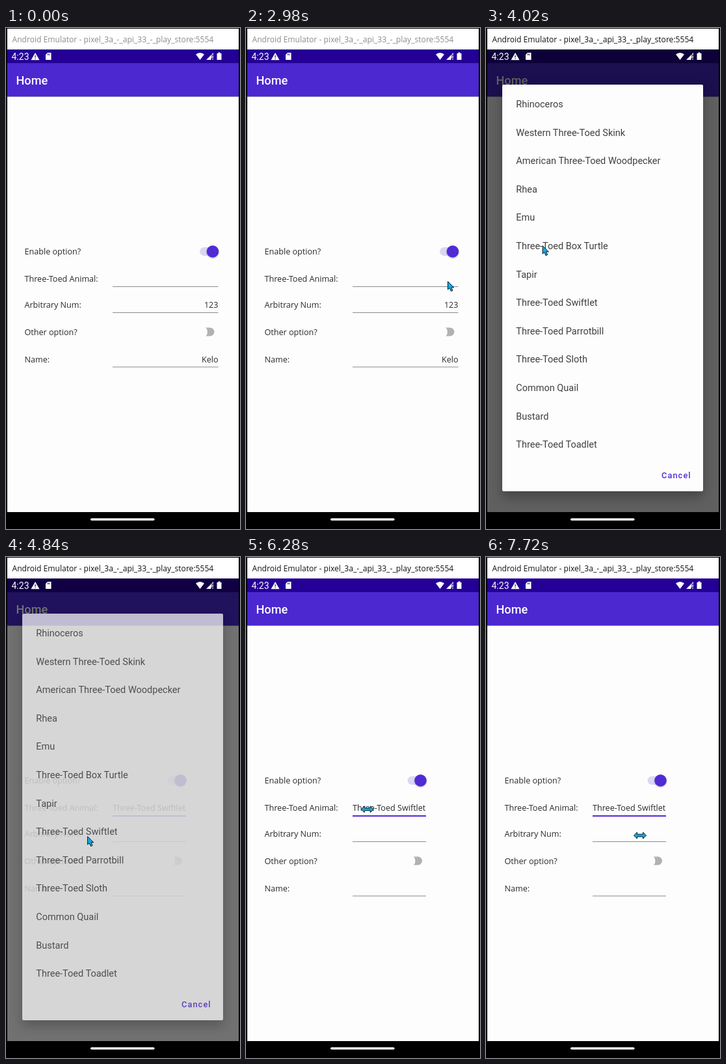
These frames come from a looping animation (360x770 px, 8000 ms). An HTML page:

```html
<!DOCTYPE html>
<html lang="en">
<head>
<meta charset="utf-8">
<title>Animal picker</title>
<style>
  html, body { margin: 0; width: 100%; height: 100%; overflow: hidden; background: #000; }
  svg { display: block; width: 360px; height: 770px; }
  text { font: 12.6px "Open Sans", "Noto Sans", sans-serif; fill: #2a2a2a; white-space: pre; }
  .roboto { font: 14.5px Roboto, sans-serif; fill: #404040; }
  .medium { font: 500 18.1px Roboto, sans-serif; fill: #fff; }
  #title { font-size: 12.1px; }
  #clock { font-size: 14px; font-weight: 400; }
  #cancel { font: 500 12.7px Roboto, sans-serif; letter-spacing: 1.13px; fill: #512bd4; }
  #panel { filter: drop-shadow(0 9px 9px rgba(0, 0, 0, .3)); }
  .thumb { filter: drop-shadow(0 1px 1px rgba(0, 0, 0, .3)); }
  .end { text-anchor: end; }
  .cursor { fill: #14a9e2; stroke: #0a1a26; stroke-width: 1; stroke-linejoin: round; }
</style>
</head>
<body>
<svg viewBox="0 0 360 770">
  <rect width="360" height="770"/>
  <rect x="2" y="1" width="356" height="32" fill="#fff"/>
  <text id="title" x="9.5" y="22">Android Emulator - pixel_3a_-_api_33_-_play_store:5554</text>

  <rect x="2" y="33" width="356" height="22" fill="#240096"/>
  <rect x="2" y="54" width="356" height="51.5" fill="#4b28d0"/>
  <rect x="2" y="105.5" width="356" height="638.5" fill="#fdfdfd"/>
  <text class="medium" x="15.5" y="87.3">Home</text>
  <g id="labels"></g>
  <g id="switches">
    <rect x="298" y="337" width="28" height="13" rx="6.5" fill="#dcd5f4"/>
    <circle class="thumb" cx="318" cy="343.5" r="9.3" fill="#512bd4"/>
    <rect x="294" y="460.5" width="26.5" height="13" rx="6.5" fill="#b2b2b2"/>
    <circle cx="300" cy="467" r="10" fill="#fdfdfd"/>
  </g>
  <g id="lines" fill="#8c8c8c">
    <rect id="field" x="164" y="397"/>
    <rect x="164" y="437" height="1"/>
    <rect x="164" y="520.5" height="1"/>
  </g>
  <g id="before">
    <text class="end" x="326.5" y="429.7">123</text>
    <text class="end" x="326.5" y="513.5">Kelo</text>
  </g>
  <text id="choice" x="164" y="389.5">Three-Toed Swiftlet</text>

  <rect id="scrim" x="2" y="33" width="356" height="711"/>
  <g fill="#fff">
    <text id="clock" class="medium" x="8.5" y="49">4:23</text>
    <path fill-rule="evenodd" d="M45 38L51.5 49.2H38.5ZM44.4 42V45.5H45.6V42ZM44.4 46.5V47.8H45.6V46.5Z"/>
    <path fill-rule="evenodd" d="M64 38H69.5V49H61V41ZM64 39.5V42H65V39.5ZM66 39.5V42H67V39.5Z"/>
    <path d="M292 40.6Q298.5 35.4 305 40.6L298.5 49Z"/>
    <path d="M319 38V41H316.5V46.5H315.5V49H308ZM317.5 42H318.8V46.5H317.5ZM317.5 47.5H318.8V49H317.5Z"/>
    <path d="M324.5 39H326.5V37.5H329.5V39H331.5V49H324.5Z"/>
    <rect x="130" y="753.5" width="98.5" height="3.6" rx="1.8"/>
  </g>

  <g id="dialog">
    <rect id="panel" x="25" y="87" width="309" height="625" rx="2" fill="#fdfdfd"/>
    <g id="items"></g>
    <text id="cancel" x="270" y="691.5">Cancel</text>
  </g>

  <path id="arrow" class="cursor" d="M.5 .5V13L3.3 10.6L5.4 15.5L8 14.4L6 9.7H9.8Z"/>
  <path id="resize" class="cursor" d="M-9.5 0L-4.5 -5V-1.9H4.5V-5L9.5 0L4.5 5V1.9H-4.5V5Z"/>
</svg>
<script>
const LOOP = 8000;
const $ = id => document.getElementById(id);
const clamp = v => Math.min(1, Math.max(0, v));
const ramp = (t, start, length) => clamp((t - start) / length);
const show = (node, on) => node.style.display = on ? '' : 'none';

function addText(parent, str, x, y, cls) {
  const node = document.createElementNS('http://www.w3.org/2000/svg', 'text');
  node.setAttribute('x', x);
  node.setAttribute('y', y);
  node.setAttribute('class', cls);
  node.textContent = str;
  parent.append(node);
}

const labels = ['Enable option?', 'Three-Toed Animal:', 'Arbitrary Num:', 'Other option?', 'Name:'];
const baselines = [347.5, 389.5, 429.7, 471.5, 513.5];
labels.forEach((s, i) => addText($('labels'), s, 28.5, baselines[i], ''));

const animals = ['Rhinoceros', 'Western Three-Toed Skink', 'American Three-Toed Woodpecker',
  'Rhea', 'Emu', 'Three-Toed Box Turtle', 'Tapir', 'Three-Toed Swiftlet',
  'Three-Toed Parrotbill', 'Three-Toed Sloth', 'Common Quail', 'Bustard', 'Three-Toed Toadlet'];
animals.forEach((s, i) => addText($('items'), s, 46.3, 122 + 43.6 * i, 'roboto'));

// Waypoints: time, x, y
const arrowPath = [
  [1760, 14, 446], [2060, 130, 425], [2330, 334, 380], [2540, 317, 405],
  [2780, 311, 390], [2980, 310, 389], [3270, 310, 389], [3480, 276, 410],
  [3900, 88, 338], [4020, 86.5, 334], [4500, 125, 429], [4900, 125, 429], [5200, 365, 470]
];
const resizePath = [
  [5800, 316, 618], [6100, 165, 500], [6350, 195, 345], [6580, 302, 442],
  [6800, 205, 482], [7000, 127, 528.5], [7200, 90, 450], [7390, 186, 363], [7720, 237, 428]
];

function follow(node, path, t, until) {
  show(node, t >= path[0][0] && t < until);
  let i = path.findIndex(p => p[0] > t);
  if (i < 0) i = path.length - 1;
  if (i < 1) i = 1;
  const [t0, x0, y0] = path[i - 1], [t1, x1, y1] = path[i];
  const k = ramp(t, t0, t1 - t0);
  node.setAttribute('transform', `translate(${x0 + (x1 - x0) * k} ${y0 + (y1 - y0) * k})`);
}

function draw(t) {
  const active = t >= 3210;
  const chosen = t >= 4840;
  const right = chosen ? 277 : 326.5;

  $('title').style.fill = active ? '#111' : '#8c8c8c';
  for (const line of $('lines').children) line.setAttribute('width', right - 164);
  $('field').setAttribute('height', active ? 2 : 1);
  $('field').style.fill = active ? '#512bd4' : '';
  $('switches').setAttribute('transform', `translate(${chosen ? -49.5 : 0} 0)`);
  show($('before'), !chosen);
  show($('choice'), chosen);

  const rise = 1 - (1 - ramp(t, 3382, 150)) ** 2;
  $('scrim').style.opacity = .62 * (ramp(t, 3380, 200) - ramp(t, 4820, 200));
  $('dialog').style.opacity = rise * (1 - ramp(t, 4800, 150));
  $('dialog').setAttribute('transform', `translate(0 ${22 * (1 - rise)})`);

  follow($('arrow'), arrowPath, t, 5200);
  follow($('resize'), resizePath, t, LOOP);
}

const begin = performance.now();
function frame() {
  draw((performance.now() - begin) % LOOP);
  requestAnimationFrame(frame);
}
frame();
</script>
</body>
</html>
```
